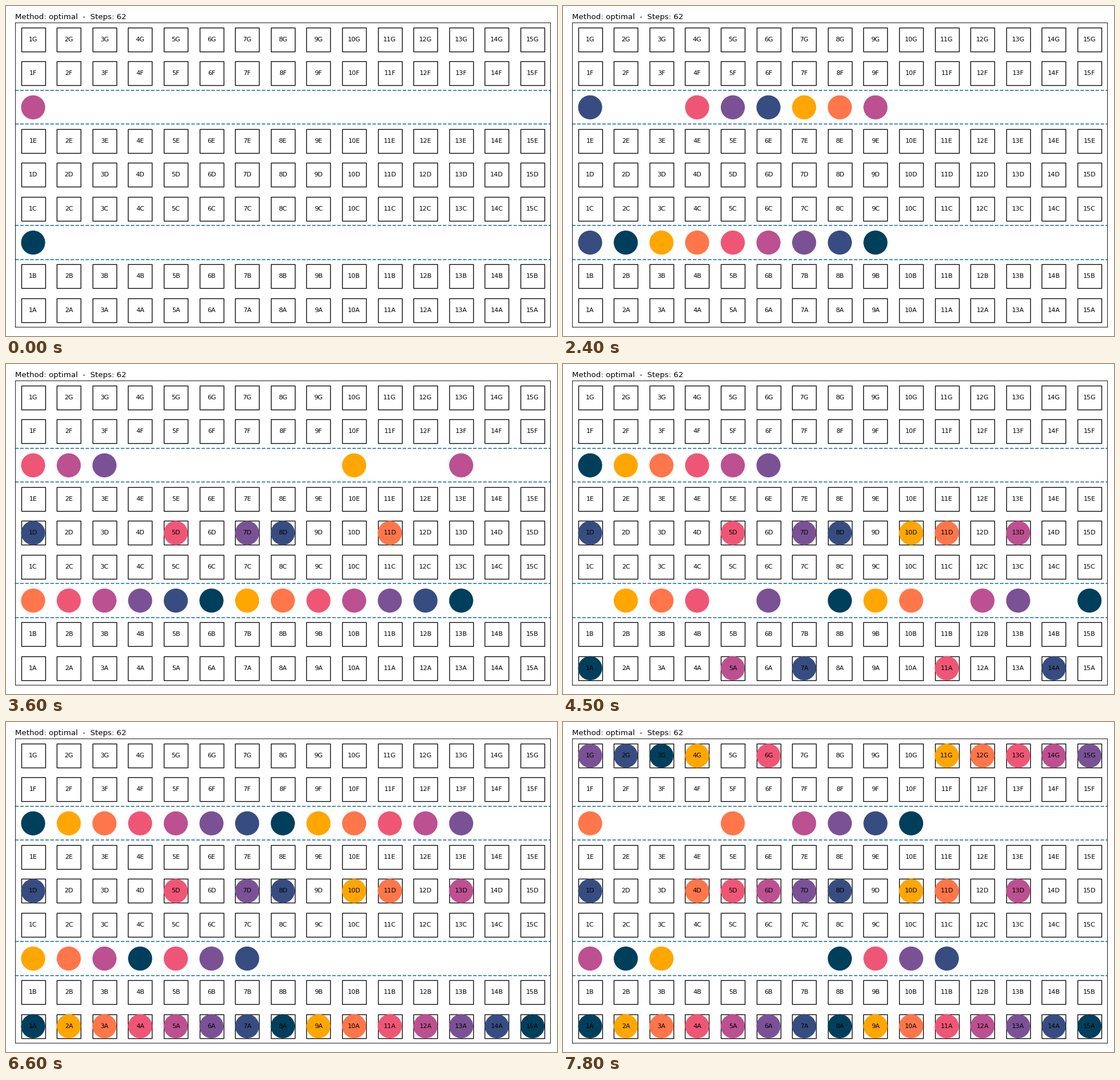
Animation of 967x579 px, one loop 8 s. Source, as a matplotlib script:

```python
import matplotlib.pyplot as plt
from matplotlib.animation import FuncAnimation

WIDTH, HEIGHT, DPI = 967, 579, 80
COLS = 15
# Lanes from bottom to top; "1" and "2" are the aisles.
LANES = "AB1CDE2FG"
PALETTE = ["#003f5c", "#374c80", "#7a5195", "#bc5090",
           "#ef5675", "#ff764a", "#ffa600"]
ROW_ORDER = "ADGBCFE"
UPPER_D = (13, 11, 10, 8, 7, 5, 1)
# Steps spent in the aisle before sitting down, by column.
STOW = {
    "A": "122312132312213",
    "D": "333221212212222",
    "G": "121232333312121",
}
TICK_MS, STEP_MS, LOOP_MS = 100, 300, 8000
STEPS = -(-LOOP_MS // STEP_MS)


class Passenger:
    def __init__(self, row, col):
        self.row, self.col = row, col
        self.x = 0
        self.wait = int(STOW[row][col - 1]) if row in STOW else 2
        seat_id = ROW_ORDER.index(row) * COLS + COLS - col
        self.color = PALETTE[seat_id % len(PALETTE)]

    def place(self, aisle):
        lane = aisle if self.wait > 0 else self.row
        return self.x, LANES.index(lane) + 1


def full_row(row):
    return [Passenger(row, c) for c in range(COLS, 0, -1)]


def advance(queue):
    """Move one aisle a step on, from the front to the back."""
    ahead = COLS + 1
    for p in queue:
        if p.wait == 0:
            continue
        if p.x == p.col:
            p.wait -= 1
        elif p.x + 1 < ahead:
            p.x += 1
        ahead = p.x
        if ahead <= 1:
            break


def simulate():
    center = full_row("D")
    aisles = {
        "1": full_row("A") + [p for p in center if p.col not in UPPER_D]
        + full_row("B"),
        "2": [p for p in center if p.col in UPPER_D] + full_row("G")
        + full_row("F"),
    }
    history = []
    for _ in range(STEPS):
        state = []
        for aisle, queue in aisles.items():
            advance(queue)
            state += [(p.place(aisle), p.color) for p in queue if p.x > 0]
        history.append(state)
    return history


plt.rcParams["font.family"] = "DejaVu Sans"
fig = plt.figure(figsize=((WIDTH + 0.01) / DPI, (HEIGHT + 0.01) / DPI),
                 dpi=DPI, facecolor="white")
left, right, top, bottom = 16.3, 955.3, 29.5, 563.4
ax = fig.add_axes([left / WIDTH, 1 - bottom / HEIGHT,
                   (right - left) / WIDTH, (bottom - top) / HEIGHT])
ax.set(xlim=(0.5, COLS + 0.5), ylim=(0.5, len(LANES) + 0.5),
       xticks=[], yticks=[])
ax.set_title("Method: optimal  -  Steps: 62", loc="left", fontsize=12)

for y, lane in enumerate(LANES, 1):
    if lane.isdigit():
        for edge in (y - 0.5, y + 0.5):
            ax.axhline(edge, color="C0", ls="--", lw=1.5)
        continue
    ax.plot(range(1, COLS + 1), [y] * COLS, "s", ms=37, mfc="white",
            mec="black", mew=1.2, zorder=1.5)
    for x in range(1, COLS + 1):
        ax.text(x, y, f"{x}{lane}", fontsize=10, ha="center", va="center",
                zorder=4)

people = ax.scatter([], [], s=37 ** 2, linewidths=1, zorder=3)
history = simulate()


def update(frame):
    places, colors = zip(*history[frame * TICK_MS // STEP_MS])
    people.set_offsets(places)
    people.set_color(colors)
    return (people,)


anim = FuncAnimation(fig, update, frames=LOOP_MS // TICK_MS,
                     interval=TICK_MS, repeat=True, repeat_delay=0)
plt.show()
```
